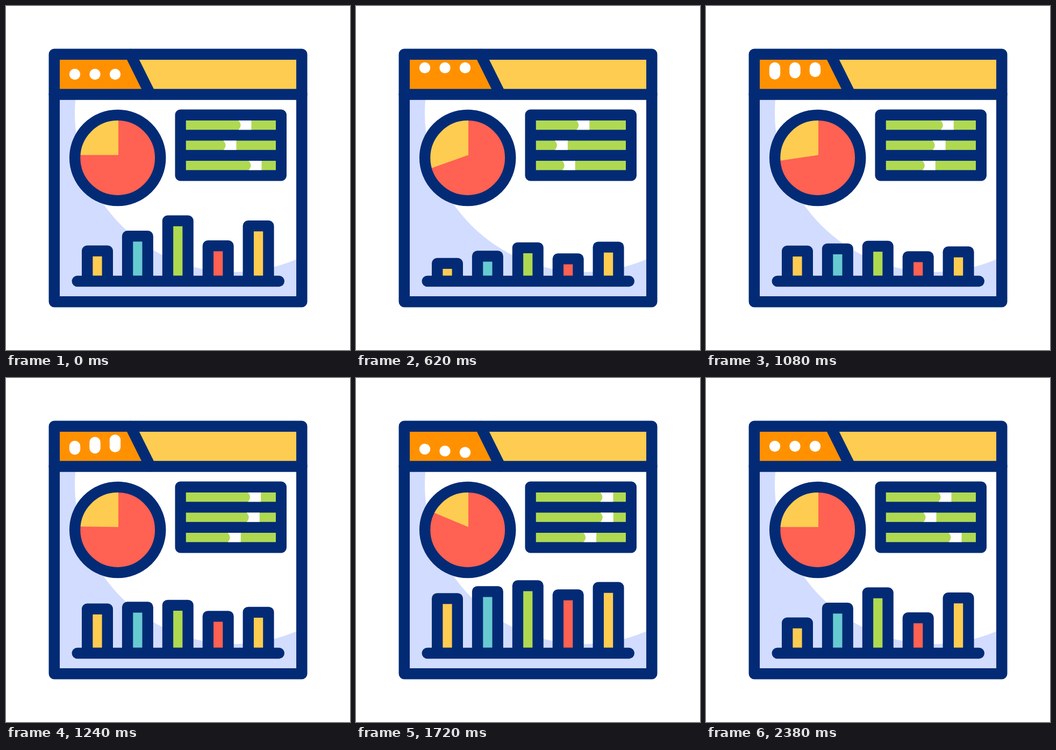
An HTML page for the animation above (2.42 s loop, 640 by 640 pixels).

```html
<!DOCTYPE html>
<html lang="en">
<head>
<meta charset="utf-8">
<title>Dashboard</title>
<style>
html, body { margin: 0; width: 100%; height: 100%; overflow: hidden; background: #fff; }
svg { display: block; width: 100vw; height: 100vh; }
</style>
</head>
<body>
<svg viewBox="0 0 640 640">
  <defs>
    <clipPath id="body"><rect x="99" y="170" width="442" height="372"/></clipPath>
    <clipPath id="disc"><circle cx="207.5" cy="282.5" r="74"/></clipPath>
  </defs>
  <rect x="90" y="90" width="460" height="460" fill="#d2dcff"/>
  <circle cx="424" cy="199" r="296" fill="#fff" clip-path="url(#body)"/>
  <path d="M98 98H236L263 165H98Z" fill="#ff9100"/>
  <path d="M236 98H542V165H263Z" fill="#fecc51"/>
  <g fill="none" stroke="#032b75" stroke-width="20.5" stroke-linecap="round" stroke-linejoin="round">
    <path d="M231.5 90L268.3 164"/>
    <rect x="89.8" y="89.8" width="460.5" height="460.5"/>
    <path d="M89.8 164.5H550.3"/>
  </g>
  <g id="dots" fill="#fff"></g>
  <g clip-path="url(#disc)">
    <rect x="130" y="205" width="156" height="156" fill="#ff6152"/>
    <path id="slice" fill="#fecc51"/>
  </g>
  <circle cx="207.7" cy="282.5" r="79.6" fill="none" stroke="#032b75" stroke-width="20.4"/>
  <rect x="314.5" y="192.5" width="207.5" height="133" rx="10" fill="#032b75"/>
  <g id="rows"></g>
  <g id="bars"></g>
  <rect x="122.5" y="501.8" width="395.5" height="20.5" rx="10.25" fill="#032b75"/>
</svg>
<script>
const STEP = 20, LOOP = 2420, LAST = 119, BASE = 502;
const $ = id => document.getElementById(id);

function set(el, attrs) {
  for (const k in attrs) el.setAttribute(k, attrs[k]);
}
function add(parent, tag, attrs) {
  const el = document.createElementNS('http://www.w3.org/2000/svg', tag);
  set(el, attrs);
  return parent.appendChild(el);
}

// Smooth 0..1 between times a and b.
function ramp(t, a, b) {
  const x = Math.min(1, Math.max(0, (t - a) / (b - a)));
  return x * x * (3 - 2 * x);
}

// Goes rest -> low -> high -> rest; span holds start and end of each move.
function swing(t, rest, low, high, span) {
  return rest
    + (low - rest) * ramp(t, span[0], span[1])
    + (high - low) * ramp(t, span[2], span[3])
    + (rest - high) * ramp(t, span[4], span[5]);
}

const span = {
  bar: [0, 40, 40, 77, 77, 110],
  row: [0, 33, 33, 72, 78, 112],
  pie: [0, 28, 36, 90, 90, LAST],
  dotTop: [2, 15, 55, 69, 78, 93],
  dotEnd: [11, 24, 31, 78, 78, 93]
};

// Columns: resting height, tallest height, colour.
const bars = [
  [56.5, 112, '#fecc51'],
  [84, 119.5, '#68cad1'],
  [112.5, 127, '#b0d952'],
  [66, 111, '#ff6152'],
  [103, 123, '#fecc51']
].map(([rest, high, color], i) => {
  const x = 141 + 74.9 * i;
  const outer = add($('bars'), 'rect', { x, width: 58, rx: 10, fill: '#032b75' });
  const inner = add($('bars'), 'rect', { x: x + 20.4, width: 17.2, fill: color });
  return t => {
    const h = swing(t - 1.5 * i, rest, 11 + rest / 3, high, span.bar);
    set(outer, { y: BASE - h, height: h + 14 });
    set(inner, { y: BASE - h + 20.3, height: Math.max(0, h - 20.5) });
  };
});

// Sliders: right edge of the white gap at rest, far left and far right.
const rows = [
  [456.5, 434, 482],
  [428.5, 393.5, 487],
  [475.5, 407, 442.5]
].map(([rest, low, high], i) => {
  const y = 213 + 37.5 * i;
  add($('rows'), 'rect', { x: 334.8, y, width: 167.2, height: 17.3, fill: '#b0d952' });
  const gap = add($('rows'), 'path', { fill: '#fff' });
  return t => {
    const x = swing(t, rest, low, high, span.row);
    set(gap, { d: `M${x - 24} ${y}H${x}v17.3H${x - 24}q8 -8.65 0 -17.3Z` });
  };
});

// Dots: the two edges travel separately, so the dot stretches.
const dots = [0, 1, 2].map(i => {
  const el = add($('dots'), 'rect', { x: 117.8 + 37.5 * i, width: 20.4, rx: 10.2 });
  return t => {
    const end = swing(t - 3 * i, 137, 125, 149, span.dotEnd);
    const top = Math.min(swing(t - 3 * i, 117, 105, 129, span.dotTop), end - 20);
    set(el, { y: top - 0.2, height: end - top + 0.4 });
  };
});

function pie(t) {
  const a = swing(t, 90, 109.5, 66.6, span.pie) * Math.PI / 180;
  const x = 209 - 120 * Math.sin(a), y = 277.3 - 120 * Math.cos(a);
  set($('slice'), { d: `M209 277.3V157.3A120 120 0 0 0 ${x} ${y}Z` });
}

const parts = [...bars, ...rows, ...dots, pie];
const start = performance.now();

function tick() {
  const ms = (performance.now() - start) % LOOP;
  const t = Math.min(Math.floor(ms / STEP), LAST);
  parts.forEach(draw => draw(t));
  requestAnimationFrame(tick);
}
tick();
</script>
</body>
</html>
```
